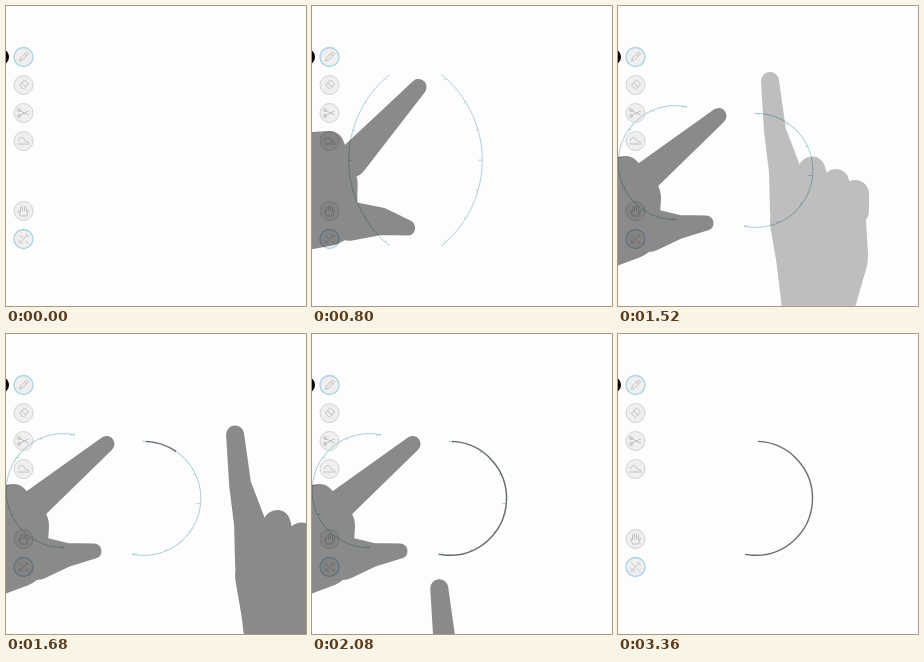
Write an HTML page with a canvas that moves like this. It is 300 by 300 pixels and loops after 3.68 s.

```html
<!DOCTYPE html>
<html lang="en">
<head>
<meta charset="utf-8">
<title>Arc ruler gesture</title>
<style>
html, body { margin: 0; width: 100%; height: 100%; overflow: hidden; background: #fdfdfd; }
canvas { display: block; width: 300px; height: 300px; }
</style>
</head>
<body>
<canvas id="stage"></canvas>
<script>
const LOOP = 3680, STEP = 80, RAD = Math.PI / 180;
const canvas = document.getElementById('stage');
const ctx = canvas.getContext('2d');
const dpr = window.devicePixelRatio || 1;
canvas.width = canvas.height = 300 * dpr;

const lerp = (a, b, p) => a + (b - a) * p;
const ramp = (t, from, to) => Math.min(1, Math.max(0, (t - from) / (to - from)));

// A hand is a set of limbs; a limb is a chain of joints [x, y, radius]
const open = {
  index: [[46, 138, 17], [109, 51, 8]],
  thumb: [[40, 201, 16], [74, 205, 15], [100, 224, 7.5]],
  palm: [[-15, 125, 28], [24, 113, 16], [16, 160, 28], [16, 190, 29], [-15, 190, 29]]
};
const pinch = {
  index: [[30, 169, 15], [100.5, 110, 8]],
  thumb: [[30, 224, 22], [60, 221, 12], [88, 217, 7.5]],
  palm: [[-15, 181, 28], [8, 164, 14], [16, 192, 27], [12, 224, 29], [-15, 232, 31]]
};
const pointing = {
  index: [[152, 75, 9], [157, 125, 11], [167, 165, 16], [172, 205, 20]],
  middle: [[194, 164, 13.5], [196, 200, 20]],
  ring: [[218, 176, 13], [218, 205, 20]],
  little: [[237, 188, 14], [237, 205, 14]],
  palm: [[200, 215, 48], [204, 250, 46], [200, 300, 36], [200, 345, 34]]
};

function blend(a, b, p) {
  const mix = {};
  for (const limb in a)
    mix[limb] = a[limb].map((joint, i) => joint.map((v, j) => lerp(v, b[limb][i][j], p)));
  return mix;
}

function fillHand(hand, alpha) {
  ctx.beginPath();
  for (const chain of Object.values(hand)) {
    for (let i = 1; i < chain.length; i++) {
      const [x1, y1, r1] = chain[i - 1], [x2, y2, r2] = chain[i];
      const dir = Math.atan2(y2 - y1, x2 - x1);
      const open = Math.acos((r1 - r2) / Math.hypot(x2 - x1, y2 - y1));
      ctx.moveTo(x1 + r1 * Math.cos(dir + open), y1 + r1 * Math.sin(dir + open));
      ctx.arc(x1, y1, r1, dir + open, dir - open + 2 * Math.PI);
      ctx.arc(x2, y2, r2, dir - open, dir + open);
      ctx.closePath();
    }
  }
  ctx.fillStyle = `rgba(0,0,0,${0.455 * alpha})`;
  ctx.fill();
}

function leftHand(t, bend, close) {
  const spread = bend * (1 - close);
  ctx.save();
  ctx.translate(4 * spread, 160);
  ctx.scale(1, 1 + 0.05 * spread);
  ctx.translate(0, -160);
  fillHand(blend(open, pinch, bend), ramp(t, 400, 560) - ramp(t, 2240, 2480));
  ctx.restore();
}

// The fingertip swings along a wide ellipse around the ruler, then drops away
function rightHand(t) {
  if (t >= 2240) return;
  const first = 6 * RAD, a = first + 179 * RAD * ramp(t, 1570, 2080);
  ctx.save();
  ctx.translate(
    129 * (Math.sin(a) - Math.sin(first)),
    90 * (Math.cos(first) - Math.cos(a)) + 70 * ramp(t, 2080, 2240));
  fillHand(pointing, ramp(t, 1370, 1600) ** 1.4);
  ctx.restore();
}

// Two mirrored edges that curl from straight lines into half circles, then tilt
function ruler(t, bend, close) {
  const radius = lerp(60, 57, close), k = Math.max(bend, 0.001) / radius;
  const half = lerp(33.5, 94.5, bend) + 3 * close, len = lerp(200, 190, bend);
  const spot = (s, inset) => {
    const a = s * k, c = Math.cos(a), n = Math.sin(a);
    return [half - (1 - c) / k - inset * c, n / k - inset * n];
  };
  ctx.save();
  ctx.globalAlpha = ramp(t, 400, 560) - ramp(t, 2320, 2640);
  ctx.translate(lerp(106.5, 101, bend) - 3.5 * close, lerp(146, 161, bend) - 0.5 * close);
  ctx.rotate(5.5 * RAD * close);
  ctx.strokeStyle = ctx.fillStyle = '#adcfd9';
  ctx.lineWidth = 1;
  for (const side of [-1, 1]) {
    ctx.save();
    ctx.scale(side, 1);
    ctx.beginPath();
    for (let i = 0; i <= 60; i++) ctx.lineTo(...spot(len * (i / 60 - 0.5), 0));
    for (let i = -3; i <= 3; i++) {
      ctx.moveTo(...spot(i * 30.7, 0));
      ctx.lineTo(...spot(i * 30.7, i ? 2 : 4));
    }
    ctx.stroke();
    for (const end of [-1, 1]) {
      ctx.beginPath();
      ctx.arc(...spot(end * len / 2, 0), bend, 0, 7);
      ctx.fill();
    }
    ctx.restore();
  }
  ctx.restore();
}

function ink(t) {
  const p = ramp(t, 1600, 2080);
  if (!p) return;
  const from = -87 * RAD;
  ctx.strokeStyle = '#696d70';
  ctx.lineWidth = 1.4;
  ctx.lineCap = 'round';
  ctx.beginPath();
  ctx.arc(137.5, 164.3, 57, from, from + 187 * RAD * p);
  ctx.stroke();
}

// Toolbar glyphs, drawn around 0,0
const icons = [
  [51, 'M-4 4L-3 1L3 -5L5 -3L-1 3Z M1 -3L3 -1', true],
  [79, 'M-4 0L1 -5L5 -1L0 4Z M-2 -2L3 2'],
  [107, 'M-5 -3L5 2M-5 3L5 -2M-6 -3a1.5 1.5 0 1 0 3 0a1.5 1.5 0 1 0 -3 0M-6 3a1.5 1.5 0 1 0 3 0a1.5 1.5 0 1 0 -3 0'],
  [135, 'M-6 3H6M-5 0C-4 -5 0 -4 1 -1S5 -1 5 2'],
  [205, 'M-3 5L-5 0L-3 1V-4M-1 0V-5M1 0V-5M3 1V-4M5 -1L3 5H-3'],
  [233, 'M-5 5L4 -4M2 -5L5 -2M-4 -4L-1 -1M2 2L5 5M-5 1L-1 5', true]
].map(([y, d, lit]) => ({ y, lit, path: new Path2D(d) }));

function disc(x, y, r, color) {
  ctx.fillStyle = color;
  ctx.beginPath();
  ctx.arc(x, y, r, 0, 7);
  ctx.fill();
}

function toolbar() {
  disc(-5, 51, 8, '#000');
  for (const { y, lit, path } of icons) {
    ctx.save();
    ctx.translate(17.5, y);
    disc(0, 0, 9.5, '#efefef');
    ctx.strokeStyle = lit ? '#acd4e6' : '#d2d2d2';
    ctx.lineWidth = lit ? 1.4 : 1;
    ctx.stroke();
    ctx.strokeStyle = '#c2c2c2';
    ctx.lineWidth = 1;
    ctx.stroke(path);
    ctx.restore();
  }
}

function draw(t) {
  const bend = ramp(t, 560, 1000), close = ramp(t, 1040, 1440);
  ctx.setTransform(dpr, 0, 0, dpr, 0, 0);
  ctx.fillStyle = '#fdfdfd';
  ctx.fillRect(0, 0, 300, 300);
  toolbar();
  ruler(t, bend, close);
  ink(t);
  leftHand(t, bend, close);
  rightHand(t);
}

const start = performance.now();
function tick() {
  const t = (performance.now() - start) % LOOP;
  draw(Math.floor(t / STEP) * STEP);
  requestAnimationFrame(tick);
}
tick();
</script>
</body>
</html>
```
